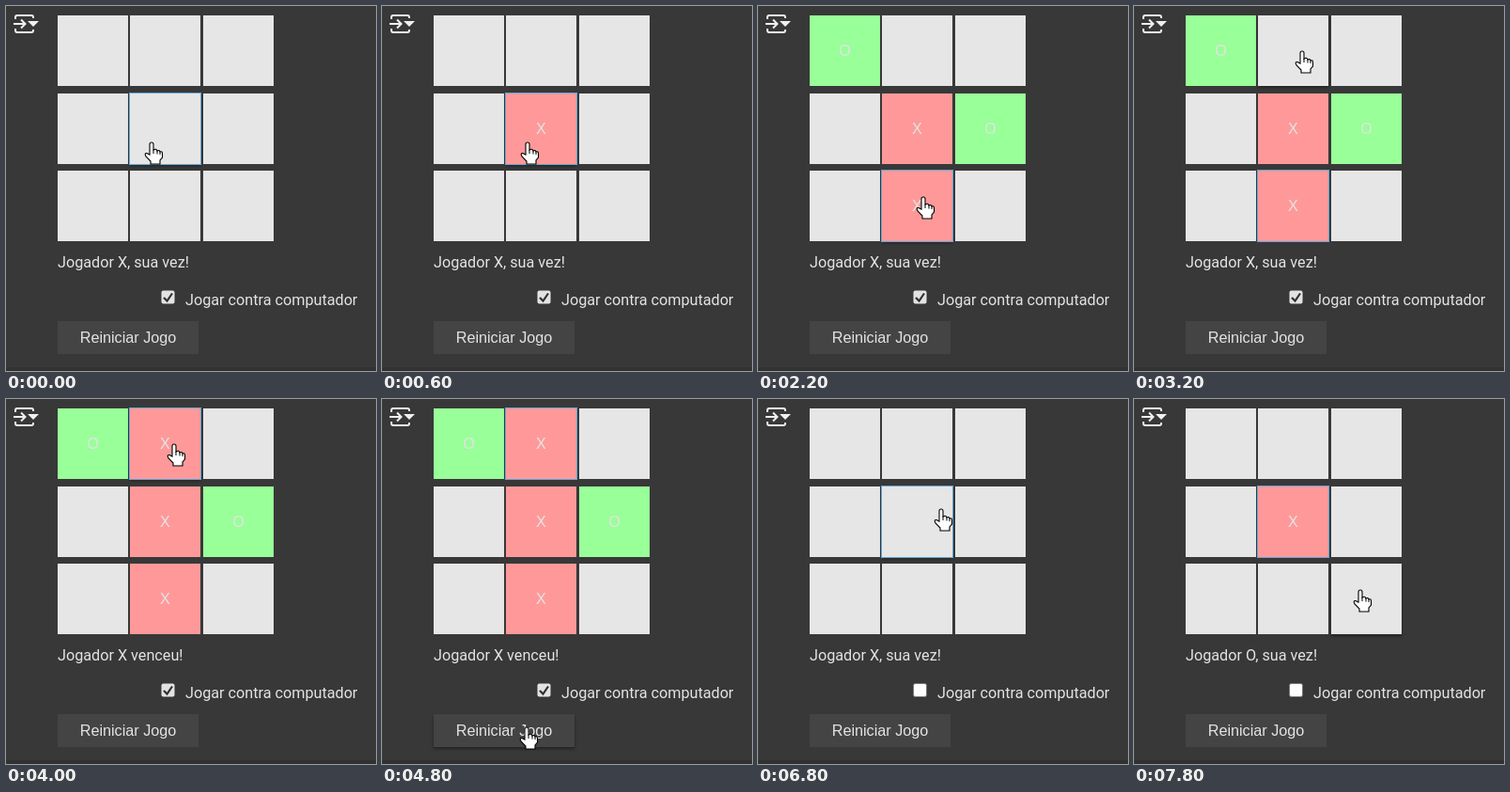
An HTML page with a canvas for the animation above (8 s loop, 394 by 388 pixels).

```html
<!DOCTYPE html>
<html lang="pt">
<head>
<meta charset="utf-8">
<style>
html, body { margin: 0; width: 100%; height: 100%; overflow: hidden; background: #383838; }
canvas { display: block; }
</style>
</head>
<body>
<canvas id="stage" width="394" height="388"></canvas>
<script>
const ctx = document.getElementById('stage').getContext('2d');
const LOOP = 8000, STEP = 200, CELL = 75;
const LABEL = '16.2px Roboto, sans-serif';
const BUTTON = '16.2px "Liberation Sans", Arial, sans-serif';
const columns = [55, 132, 210], rows = [10, 93, 175];
const restart = { x: 55, y: 335, w: 150, h: 35 };
const cells = rows.flatMap(y => columns.map(x => ({ x, y, w: CELL, h: CELL })));
const checkbox = { x: 165, y: 302, w: 15, h: 15 };

// Pointer tip: time, x, y
const pointerPath = [
  [0, 155, 145], [600, 155, 145], [1400, 176, 203], [2400, 176, 203],
  [3200, 179, 48], [4000, 179, 48], [4800, 154, 349], [5200, 154, 349],
  [5600, 171, 315], [6200, 171, 315], [6600, 184, 128], [6800, 195, 117],
  [7200, 200, 125], [7800, 241, 203], [8000, 241, 203]
];

// Marks: cell, player, shown from, shown until
const marks = [
  [4, 'X', 600, 5200], [5, 'O', 800, 5200], [7, 'X', 2000, 5200],
  [0, 'O', 2200, 5200], [1, 'X', 4000, 5200], [4, 'X', 7200, 8000]
];

// Focused control from each time on
const focusChanges = [
  [0, cells[4]], [1400, cells[7]], [3400, cells[1]],
  [5000, restart], [6200, null], [6600, cells[4]]
];
const messages = [
  [0, 'Jogador X, sua vez!'], [4000, 'Jogador X venceu!'],
  [5200, 'Jogador X, sua vez!'], [7200, 'Jogador O, sua vez!']
];

const hand = new Path2D('M-2 13V2Q-2 0 0 0T2 2V8Q5 6 6 9Q8 7.5 9 10Q11.5 9 11.5 12V16L9 19V23H-1V20L-6 15Q-8 11-5 11.5Z');
const fingers = new Path2D('M2 8V12M6 9V12.5M9 10V13');
const arrow = new Path2D('M0 0V16.5L3.8 13L6.5 19L9 18L6.4 12H11.5Z');
const bracket = new Path2D('M10 14V12Q10 10 12 10H27Q29 10 29 12V13M10 24V26Q10 28 12 28H27Q29 28 29 26V25M8 19H20M16 14.5L20.5 19L16 23.5');
const caret = new Path2D('M23 16H35L29 22Z');
const tick = new Path2D('M168 310L171.5 313.5L177 305.5');

const latest = (list, t) => list.filter(([from]) => from <= t).pop()[1];
const inside = (b, p) => p.x >= b.x && p.x < b.x + b.w && p.y >= b.y && p.y < b.y + b.h;

function pointerAt(t) {
  const i = pointerPath.findIndex(key => key[0] > t);
  const [t0, x0, y0] = pointerPath[i - 1], [t1, x1, y1] = pointerPath[i];
  const k = (t - t0) / (t1 - t0);
  return { x: Math.round(x0 + (x1 - x0) * k), y: Math.round(y0 + (y1 - y0) * k) };
}

function text(string, x, y, font, align = 'left') {
  ctx.font = font;
  ctx.textAlign = align;
  ctx.fillStyle = '#e3e3e3';
  ctx.fillText(string, x, y);
}

function stroke(path, color, width) {
  ctx.strokeStyle = color;
  ctx.lineWidth = width;
  ctx.stroke(path);
}

function box(b, color, hovered) {
  ctx.save();
  if (hovered) {
    ctx.shadowColor = 'rgba(0,0,0,.4)';
    ctx.shadowBlur = 3;
    ctx.shadowOffsetY = 2;
  }
  ctx.fillStyle = color;
  ctx.fillRect(b.x, b.y, b.w, b.h);
  ctx.restore();
}

function drawCheckbox(checked, hovered) {
  const { x, y, w, h } = checkbox;
  const outline = new Path2D();
  outline.roundRect(x + .5, y + .5, w - 1, h - 1, 2);
  ctx.fillStyle = !checked ? '#fff' : hovered ? '#5c5c5c' : '#e3e3e3';
  ctx.fill(outline);
  if (!checked) stroke(outline, '#767676', 1);
  else stroke(tick, hovered ? '#fff' : '#303030', 2.2);
}

function drawPointer(p, overButton) {
  ctx.save();
  ctx.translate(p.x, p.y);
  const shape = overButton ? hand : arrow;
  ctx.fillStyle = '#fff';
  ctx.fill(shape);
  stroke(shape, '#000', 1.1);
  if (overButton) stroke(fingers, '#000', 1);
  ctx.restore();
}

function draw(t) {
  const pointer = pointerAt(t);
  const focused = latest(focusChanges, t);
  ctx.fillStyle = '#383838';
  ctx.fillRect(0, 0, 394, 388);
  ctx.fillStyle = '#313131';
  ctx.fillRect(0, 384, 394, 4);

  stroke(bracket, '#f0f0f0', 2);
  ctx.fillStyle = '#f0f0f0';
  ctx.fill(caret);

  cells.forEach((cell, i) => {
    const mark = marks.find(([index, , from, to]) => index === i && t >= from && t < to);
    const color = !mark ? '#e6e6e6' : mark[1] === 'X' ? '#ff9999' : '#99ff99';
    box(cell, color, inside(cell, pointer));
    if (mark) text(mark[1], cell.x + CELL / 2, cell.y + 43, BUTTON, 'center');
  });

  text(latest(messages, t), 55, 278, LABEL);
  drawCheckbox(t < 6200, inside(checkbox, pointer));
  text('Jogar contra computador', 191, 318, LABEL);
  box(restart, '#444', inside(restart, pointer));
  text('Reiniciar Jogo', 130, 358, BUTTON, 'center');

  if (focused) {
    ctx.strokeStyle = '#64a5d8';
    ctx.lineWidth = 1;
    ctx.strokeRect(focused.x - .5, focused.y - .5, focused.w + 1, focused.h + 1);
  }
  drawPointer(pointer, [...cells, restart].some(b => inside(b, pointer)));
}

function frame() {
  draw(Math.floor(performance.now() % LOOP / STEP) * STEP);
  requestAnimationFrame(frame);
}
frame();
</script>
</body>
</html>
```
